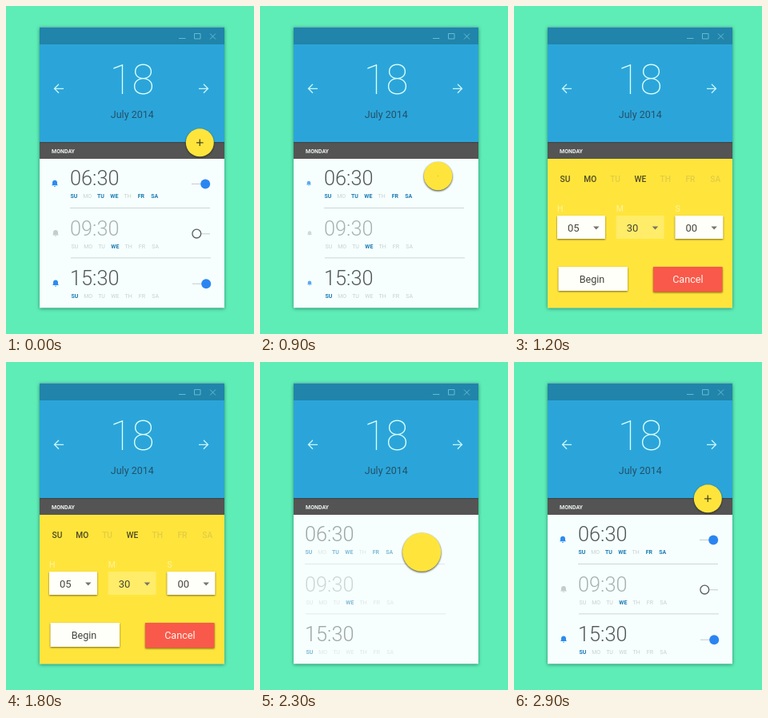
Write an HTML page that moves like this. It is 310 px wide and 410 px high and loops after 3000 ms.

```html
<!DOCTYPE html>
<html lang="en">
<head>
<meta charset="utf-8">
<title>Alarm panel</title>
<style>
  html, body { margin: 0; width: 100%; height: 100%; overflow: hidden; background: #5eedb6; }
  svg { display: block; width: 310px; height: 410px; font-family: Roboto, "Open Sans", sans-serif; }
  .mid { text-anchor: middle; }
  .card { filter: drop-shadow(0 1px 2px rgba(0, 70, 60, .6)); }
  .lift { filter: drop-shadow(0 1px 1px rgba(80, 65, 0, .75)); }
  #disc { filter: drop-shadow(0 1.5px 1px rgba(40, 40, 30, .9)); }
  .line { fill: none; }
</style>
</head>
<body>
<svg viewBox="0 0 310 410">
  <defs>
    <clipPath id="panel"><rect x="42" y="191" width="231" height="186.3"/></clipPath>
  </defs>
  <rect class="card" x="42" y="26.5" width="231" height="350.8" fill="#f6fffe"/>
  <g clip-path="url(#panel)"><g id="list"></g></g>
  <rect x="42" y="26.5" width="231" height="22" fill="#2184aa"/>
  <rect x="42" y="48" width="231" height="122" fill="#2ba5d9"/>
  <rect x="42" y="170" width="231" height="21" fill="#545454"/>
  <rect x="42" y="170" width="231" height="1.2" fill="#3f4548"/>
  <path class="line" stroke="#62bcd6" d="M216 40.5h8.500M235.500 34.500h7.500v6.500h-7.500zM255 34.500l7 7M262 34.500l-7 7"/>
  <path class="line" stroke="#c9f6fa" stroke-width="1.3"
    d="M72 103.300H60.300M66 97.800l-5.500 5.500 5.500 5.500M241 103.300h11.500M247 97.800l5.500 5.500-5.500 5.500"/>
  <text class="mid" x="157.600" y="110" font-size="51" font-weight="140" fill="#dcffff">18</text>
  <text class="mid" x="157.800" y="140" font-size="12.5" fill="#25506a">July 2014</text>
  <text x="57" y="184.300" font-size="7" font-weight="700" fill="#eef2f2">MONDAY</text>
  <g id="fab">
    <circle id="disc" fill="#ffe53b"/>
    <path id="plus" d="M-4.300 0h8.600M0-4.300v8.600" fill="none" stroke="#4a4526" stroke-width="1.300"/>
  </g>
  <g id="form"></g>
</svg>
<script>
const $ = id => document.getElementById(id);
const LOOP = 3000, STEP = 100;
const DAYS = ['SU', 'MO', 'TU', 'WE', 'TH', 'FR', 'SA'];

const label = (x, y, size, fill, str, more = 'class="mid"') =>
  `<text x="${x}" y="${y}" font-size="${size}" fill="${fill}" ${more}>${str}</text>`;
const box = (x, y, w, h, fill, more = 'class="lift"') =>
  `<rect x="${x}" y="${y}" width="${w}" height="${h}" fill="${fill}" ${more}/>`;

// Alarm list
function alarm([time, on, days], row) {
  const y = 224.2 + row * 62.4, dx = row ? 1 : 0;
  const bell = `<g transform="translate(${61 + dx} ${y - 2.5})"><path class="bell" fill="${on ? '#2b8cee' : '#c6cccc'}"
    d="M-4 2.500L-3 1.200V-1C-3-3-1.600-4 0-4S3-3 3-1V1.200L4 2.500zM-1 3.200h2a1 1 0 0 1-2 0z"/></g>`;
  const rail = `<path class="line" stroke="#c3caca" d="M${(on ? 232 : 237) + dx} ${y - 1.8}h17"/>`;
  const knob = on ? `<circle cx="${249.2 + dx}" cy="${y - 1.8}" r="6" fill="#2b85f0"/>`
    : `<circle cx="238.300" cy="${y - 2}" r="5.400" fill="#f6fffe" stroke="#565b5b" stroke-width="1.300"/>`;
  const week = DAYS.map((d, i) => {
    const lit = days.includes(d);
    return label(84.9 + dx + i * 16.8, y + 15.9, 7, lit ? '#1c7ab4' : '#c8cfcf', d,
      `class="mid" font-weight="${lit ? 700 : 400}"`);
  }).join('');
  const rule = row < 2 ? `<path class="line" stroke="#ced5d5" d="M${80 + dx} ${y + 28.3}h175"/>` : '';
  return label(80, y + .2, 25.3, on ? '#505656' : '#a9b0b0', time, 'font-weight="300"') +
    week + rule + bell + `<g class="toggle">${rail + knob}</g>`;
}
$('list').innerHTML = [
  ['06:30', true, 'SU TU WE FR SA'],
  ['09:30', false, 'WE'],
  ['15:30', true, 'SU']
].map(alarm).join('');

// Timer form
function picker([name, value], i) {
  const x = 54 + i * 73.7, flat = i === 1;
  return label(x, 256.5, 10.5, '#fff3a0', name, '') +
    box(x, 262, 60, 29, flat ? '#ffec68' : '#fffffa', flat ? '' : undefined) +
    label(x + 20.3, 281.5, 13, '#47463a', value) +
    `<path d="M${x + 45} 275.500h7.500l-3.750 4z" fill="#77756a"/>`;
}
$('form').innerHTML =
  DAYS.map((d, i) => label(64 + i * 31.3, 220.3, 10.2,
    'SU MO WE'.includes(d) ? '#4b4727' : '#e4cc45', d, 'class="mid" font-weight="500"')).join('') +
  [['H', '05'], ['M', '30'], ['S', '00']].map(picker).join('') +
  box(55.5, 326, 86.5, 30, '#fffffa') + label(97.5, 346, 12.6, '#45453d', 'Begin') +
  box(174, 326, 86.5, 31.3, '#f9594a') + label(217.3, 346.3, 12.6, '#fff5ee', 'Cancel');

// Smooth rise from 0 to 1 between two times
function ease(t, from, to) {
  const u = Math.min(1, Math.max(0, (t - from) / (to - from)));
  return u * u * (3 - 2 * u);
}
const pulse = (t, a, b, c, d) => ease(t, a, b) - ease(t, c, d);
const curve = (p, a, b, c) => (1 - p) ** 2 * a + 2 * p * (1 - p) * b + p * p * c;
const bells = document.querySelectorAll('.bell');
const toggles = document.querySelectorAll('.toggle');

function draw(t) {
  const open = pulse(t, 700, 1180, 2080, 2600);
  const away = pulse(t, 1000, 1100, 2300, 2700);
  const bell = 1 - pulse(t, 800, 1100, 2300, 2650);
  const plus = Math.max(0, 1 - 2 * open);
  const x = curve(open, 242.3, 226.4, 156), y = curve(open, 170.8, 228, 276);
  const r = 17.5 + 142 * open ** 6.3;

  $('disc').setAttribute('cx', x);
  $('disc').setAttribute('cy', y);
  $('disc').setAttribute('r', r);
  $('plus').setAttribute('transform', `translate(${x} ${y}) scale(${plus})`);
  $('plus').style.opacity = plus;
  $('fab').setAttribute('clip-path', r > 26 ? 'url(#panel)' : 'none');
  $('list').setAttribute('transform', `translate(${-24 * away} 0)`);
  $('list').style.opacity = 1 - .48 * away;
  for (const el of bells) {
    el.setAttribute('transform', `scale(${bell})`);
    el.style.opacity = bell;
  }
  for (const el of toggles) el.style.opacity = Math.max(0, 1 - 3 * open);
  $('form').style.opacity = pulse(t, 1080, 1200, 1800, 2000);
}

const start = performance.now();
function tick(now) {
  const t = Math.max(0, now - start) % LOOP;
  draw(Math.floor(t / STEP) * STEP);
  requestAnimationFrame(tick);
}
draw(0);
requestAnimationFrame(tick);
</script>
</body>
</html>
```
